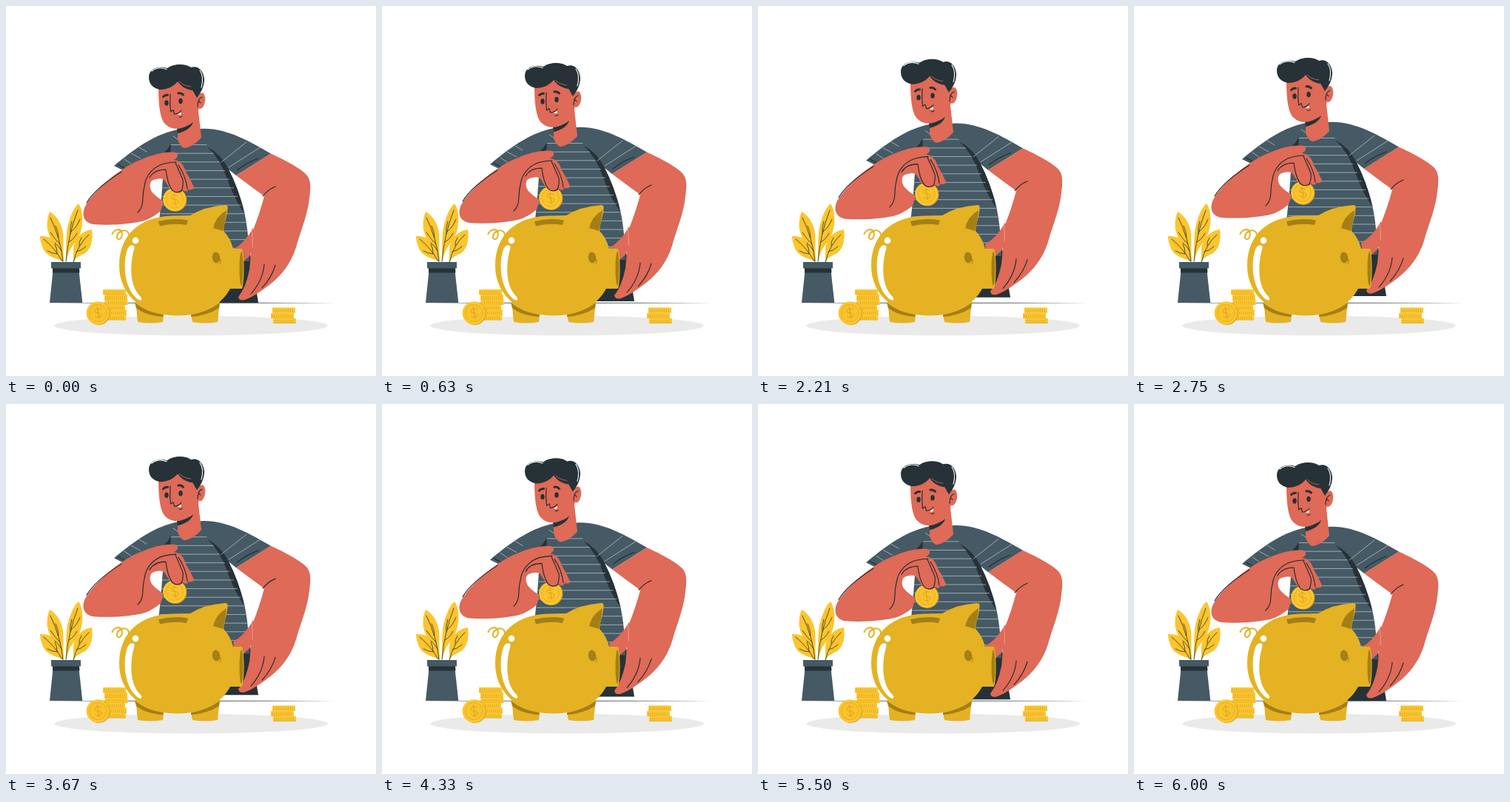
An HTML page that plays this animation: 500 by 500 pixels, repeating every 6040 ms.

```html
<!DOCTYPE html>
<html lang="en">
<head>
<meta charset="utf-8">
<title>Piggy bank</title>
<style>
html, body { margin: 0; width: 100%; height: 100%; overflow: hidden; background: #fff; }
svg { display: block; width: 100vw; height: 100vh; }
.skin { fill: #de6a57; }
.shirt { fill: #455a64; }
.dark { fill: #263238; }
.pig { fill: #e4b223; }
.shade { fill: #a47f17; }
.leaf { fill: #fbc52d; }
.white { fill: #fff; }
.ink, .stripe, .vein { fill: none; stroke-linecap: round; stroke-linejoin: round; }
.ink { stroke: #202a30; stroke-width: 1.1; }
.vein { stroke: #263238; stroke-width: .8; }
.stripe { stroke: #b4bfc4; stroke-width: .8; }
</style>
</head>
<body>
<svg viewBox="0 0 500 500" xmlns="http://www.w3.org/2000/svg">
  <defs>
    <clipPath id="torso"><path d="M232 182L238 191Q248 193 264 179L276 193Q300 222 321 278Q327 303 330 340H205L213 210L223 186Z"/></clipPath>
    <g id="coin">
      <ellipse cx="1" cy=".5" rx="15.3" ry="15.7" fill="#dfa81f"/>
      <circle cx="-.5" r="15.4" fill="#fcc62e"/>
      <circle cx="-.3" r="11.7" fill="#fac22c" stroke="#dfa81f" stroke-width=".8"/>
      <path d="M4.2-4.3C2-7.3-4-6.6-4.1-3.3C-4.2.3 4.3-.8 4.2 3.2C4 6.8-2.8 7-4.7 3.8M0-8V8" transform="rotate(-10)"
        fill="none" stroke="#d9a11d" stroke-width=".9" stroke-linecap="round"/>
    </g>
  </defs>

  <ellipse cx="250" cy="432" rx="185" ry="13.3" fill="#eaeaea"/>
  <path d="M52 401.3Q250 399.6 448 401.3Q250 403 52 401.3Z" fill="#848c91"/>

  <g id="plant">
    <path class="leaf" d="M77 345C73 331 55 314 55.500 295Q56 284 59 278C70 284 78 298 77.500 315Q77 330 78 345Z"/>
    <path class="leaf" d="M81 345C82 330 79 308 86 288Q91 273 98 267C105 276 105 298 99 310C93 322 84 328 82 345Z"/>
    <path class="leaf" d="M76 345C68 340 54 340 49 325Q46 317 46 311C58 310 70 316 74 330Q76 338 77 345Z"/>
    <path class="leaf" d="M91 346C92 335 89 325 95 315Q103 304 116 302C118 315 115 328 107 334C100 338 95 338 92 346Z"/>
    <path class="vein" d="M77 345Q74 315 60 286M71 313Q71 305 67 297M73 322Q66 315 60 306M75 331Q73 326 66 320"/>
    <path class="vein" d="M81 345Q84 309 97 276M87 308Q86 300 89 291M88 305Q96 299 100 288M85 319Q92 315 96 307"/>
    <path class="vein" d="M76 345Q66 327 51 315M69 333Q69 328 66 322M70 335Q63 335 56 331"/>
    <path class="vein" d="M91 346Q97 322 112 309M95 332Q102 331 108 325M99 324Q98 319 102 313"/>
    <path class="shirt" d="M64 353H98L103.300 401H59Z"/>
    <path class="dark" d="M63 354H99L99.500 360.500H63Z"/>
    <rect class="shirt" x="61" y="346" width="40" height="8.500"/>
  </g>

  <g id="man">
    <path class="dark" d="M270 330L330 335L341 401H270Z"/>
    <path class="shirt" d="M232 167C203 173 178 189 146 216L160 223L213 214Q211 255 206 300V345H329Q328 300 320 270Q314 249 301 221L311 229L358 199.500C329 183 297 164 263 166Z"/>
    <path class="dark" d="M272 190Q291 201 300 219Q315 247 322 280Q309 262 299 234Q290 207 272 190Z"/>
    <path class="dark" d="M223 185L222 201H210Q219 195 223 185Z"/>
    <g id="stripes" clip-path="url(#torso)"></g>
    <path class="stripe" d="M291 211L325 184M301 218L345 190M169 199L182 206M180 191L190 197M160 207L169 213M226 176L232 180"/>
    <path class="ink" d="M312 222Q326 211 341 206M151 214L160 219"/>

    <path class="skin" d="M232 158V181Q236 191 241 192Q252 191 264 178L260 142Z"/>
    <path class="dark" d="M231 165Q245 164 253 157Q249 168 232 172Z"/>
    <ellipse class="skin" cx="263.500" cy="128" rx="5.600" ry="11" transform="rotate(8 263 128)"/>
    <path class="skin" d="M206 108C206 128 207 142 211 153C215 163 226 168 237 165C250 161 258 150 261 138L257 108L232 96Z"/>
    <path class="ink" d="M259 136Q259 125 265 123M260 128L263 131" stroke-width="1"/>
    <path class="dark" d="M193 96C193 86 204 80 218 84C226 78 242 77 250 83C260 80 267 88 268 99C268 109 263 118 258 124C255 119 253 115 252 114C243 113 236 108 232 102C226 109 218 113 208 113C198 111 193 105 193 96Z"/>
    <path d="M197 88Q206 81 217 85.500M262 87Q268 96 264 110" fill="none" stroke="#fff" stroke-width="1.100" stroke-linecap="round"/>
    <path d="M234 102Q240 108 250 109" fill="none" stroke="#de6a57" stroke-width=".8"/>
    <path d="M212.500 122.500Q215 119.800 218.500 120.200M233 117.800Q237 117.200 239.500 120" fill="none" stroke="#263238" stroke-width="3" stroke-linecap="round"/>
    <ellipse class="dark" cx="217" cy="131" rx="2.700" ry="3.700"/>
    <ellipse class="dark" cx="236" cy="128.500" rx="2.700" ry="3.700"/>
    <path class="ink" d="M222 119Q221 132 222.500 143L226 140.500L227.500 146Q233 146 237 141"/>
    <path class="white" d="M232 146Q234.500 145.500 236 143.500L237 146Q235 148.500 232 146Z"/>
    <path class="ink" d="M234 150Q237 150.500 238 149" stroke-width=".7"/>

    <use href="#coin" x="228" y="261.500"/>
    <path class="skin" d="M230 198C215 196 198 201 184 207C170 212 158 220 146 229C128 243 111 262 106 273C102 284 106 293 118 295C145 297 176 294 190 289Q201 284 209 277L213 264Q203 258 197 251Q192 242 197 236Q205 232 213 234L221 246Q226 253 232 252Q236 254 239 249Q245 253 246 248Q254 249 254 245Q249 233 243 224Q240 213 232 209L227 208Q234 204 231.500 200Z"/>
    <path class="ink" d="M109 266Q121 246 156 224M178 279C188 270 183 258 187 244C189 226 202 216 214 213Q222 211 230 211M194 232Q200 221 216 221Q218 239 224 248Q230 255 238 249M229 212Q234 223 239 235Q240 243 237 250M233 215Q243 230 245 247"/>

    <path class="skin" d="M334 300Q322 321 307 329L309 346H320L329 338L338 318Z"/>
    <path class="skin" d="M358 199.500C374 207 398 219 406 228C413 236 412 247 409 267C405 290 397 307 392 326C385 349 371 365 357 376C347 384 334 393 323 397Q315 399 314 393Q324 381 329 356Q331 335 333 305Q343 280 349 257Q331 244 311 229Z"/>
    <path class="ink" d="M347 257Q354 248 364 244M349 349Q347 371 331 389M364 350Q359 367 346 381"/>
    <path d="M332 301Q334 314 333 326" fill="none" stroke="#efb0a5" stroke-width=".7"/>
  </g>

  <g id="stacks"></g>

  <g id="pig">
    <path d="M143.500 308C146 302 154 300 156 305C159 312 152 319 150 313C149 305 161 300 165 306C168 311 165 317 167 323" fill="none" stroke="#e4b223" stroke-width="2" stroke-linecap="round"/>
    <path class="pig" d="M175 398L178 427Q195 430 212 427L214 410ZM249 410L252 427Q269 430 286 427L289 398Z"/>
    <path class="shade" d="M174 401Q190 414 213 417L212 420Q188 418 176 408ZM250 417Q273 413 289 401L288 408Q273 418 250 420Z"/>
    <path class="pig" d="M153 351C153 309 181 285 224 283.500Q238 283 249 283Q268 271 296 269Q300 269 299.500 273C299 285 295 292 294 304Q303 313 307 328H318.500Q323 355 318.500 382H303C290 406 264 418.500 231 418.500C185 418.500 153 390 153 351Z"/>
    <path class="shade" d="M298 276Q283 285 280 300L293 304Q297 289 298 276Z"/>
    <ellipse class="pig" cx="318.300" cy="355" rx="3.200" ry="27"/>
    <ellipse class="shade" cx="318" cy="355" rx="2.500" ry="23"/>
    <path class="shade" d="M206 291Q226 286 246 289.500L244 296Q225 293 208 297.500Z"/>
    <ellipse class="shade" cx="284" cy="340" rx="5.200" ry="7.500" transform="rotate(-8 284 340)"/>
    <path d="M288 349Q291 347 290 342" fill="none" stroke="#a47f17" stroke-width="1"/>
    <circle class="white" cx="175" cy="317" r="4.400"/>
    <path class="white" d="M173 324Q166 321 163 332C156 360 165 390 181 398Q185 397 182 393C167 379 167 350 173 329Q174 326 173 324Z"/>
  </g>
  <use href="#coin" x="124.500" y="415"/>
</svg>
<script>
const LOOP = 6040, STEP = 40, HALF = 3000, RISE = 10;
const NS = 'http://www.w3.org/2000/svg';
const byId = id => document.getElementById(id);

function add(parent, tag, attrs) {
  const el = document.createElementNS(NS, tag);
  for (const key in attrs) el.setAttribute(key, attrs[key]);
  parent.appendChild(el);
}

for (let i = 0; i < 13; i++) {
  add(byId('stripes'), 'path', { class: 'stripe', d: `M205 ${187.5 + i * 11.65}H331` });
}

// A coin lying flat, seen from its milled edge.
function flatCoin(x, y, w) {
  const g = byId('stacks');
  add(g, 'rect', { x, y, width: w, height: 6.8, rx: .8, fill: '#fcc62e' });
  add(g, 'path', { d: `M${x} ${y + 6.6}h${w}`, stroke: '#dfa81f', 'stroke-width': .8 });
  for (let i = 2; i < w - 1; i += 2.8) {
    add(g, 'path', { d: `M${x + i} ${y + 2.2}v3.3`, stroke: '#d9a11d', 'stroke-width': .7 });
  }
}

[131, 133, 133.5, 130, 132, 131].forEach((x, i) => flatCoin(x, 383 + i * 6.9, 31));
[360, 358, 361].forEach((x, i) => flatCoin(x, 407.5 + i * 7.2, 31));

const man = byId('man');
const start = performance.now();

function draw(now) {
  const elapsed = Math.max(0, now - start) % LOOP;
  const t = Math.floor(elapsed / STEP) * STEP;
  const lift = RISE * (1 - Math.abs(t / HALF - 1));
  man.setAttribute('transform', `translate(0 ${-lift.toFixed(3)})`);
  requestAnimationFrame(draw);
}
draw(start);
</script>
</body>
</html>
```
